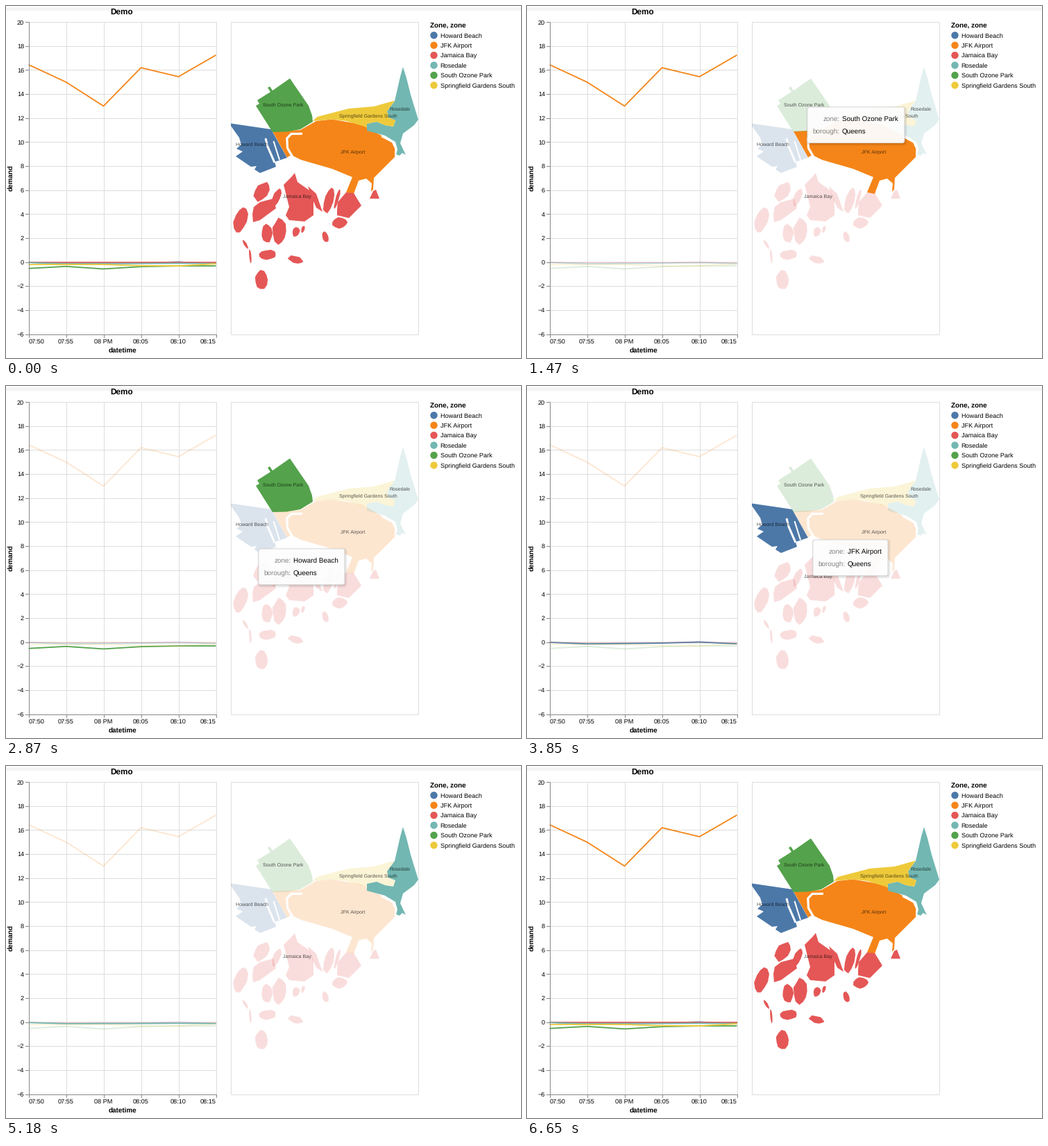
These frames come from a looping animation (742 px wide and 508 px high, 6720 ms). A matplotlib script:

```python
import matplotlib.pyplot as plt
import numpy as np
from matplotlib.animation import FuncAnimation
from matplotlib.patches import Circle, FancyBboxPatch, Polygon, Rectangle
from matplotlib.transforms import Affine2D

W, H, DPI = 742, 508, 100
PX = 72 / DPI
FRAMES, INTERVAL = 96, 70
DIM = 0.2

plt.rcParams["font.family"] = "Liberation Sans"
plt.rcParams["text.hinting"] = "no_hinting"
plt.rcParams["toolbar"] = "None"

HOWARD, JFK, BAY = "Howard Beach", "JFK Airport", "Jamaica Bay"
ROSEDALE, OZONE = "Rosedale", "South Ozone Park"
SPRINGFIELD = "Springfield Gardens South"

# Selected zone from each start frame on
SELECTED = [(0, None), (7, JFK), (31, OZONE), (49, HOWARD),
            (67, ROSEDALE), (94, None)]

# Tooltip: start, end of move, last frame shown, zone, from, to
HOVERS = [
    (15, 15, 15, OZONE, (425, 153), (425, 153)),
    (16, 16, 18, OZONE, (442, 163), (442, 163)),
    (19, 21, 36, OZONE, (429, 157), (404, 146)),
    (37, 38, 38, OZONE, (400, 143), (391, 160)),
    (39, 41, 43, HOWARD, (379, 186), (364, 235)),
    (44, 46, 54, HOWARD, (365, 234), (367, 232)),
    (55, 55, 55, JFK, (412, 222), (412, 222)),
    (62, 63, 64, ROSEDALE, (580, 149), (574, 147)),
    (71, 73, 73, ROSEDALE, (541, 186), (574, 84)),
]

fig = plt.figure(figsize=(W / DPI, H / DPI), dpi=DPI, facecolor="white")
ax = fig.add_axes([0, 0, 1, 1])
ax.set_xlim(0, W)
ax.set_ylim(H, 0)
ax.axis("off")


def text(x, y, s, size, ha="left", **kw):
    """Text whose capitals are centred on y; size in pixels."""
    return ax.text(x, y + 0.36 * size, s, fontsize=size * PX, ha=ha,
                   va="baseline", **kw)


def line(xs, ys, color, width=1.0, **kw):
    return ax.plot(xs, ys, color=color, lw=width * PX, **kw)[0]


def frame_box(x0, y0, x1, y1):
    ax.add_patch(Rectangle((x0, y0), x1 - x0, y1 - y0, fill=False,
                           ec="#dddddd", lw=PX, zorder=1))


# Line chart
LEFT, RIGHT, TOP, BOTTOM = 32.5, 302.5, 23.2, 473.5


def chart_y(v):
    return TOP + (20 - np.asarray(v)) * (BOTTOM - TOP) / 26


ax.add_patch(Rectangle((0, 1.5), W, 5, fc="#f4f4f4", ec="none", zorder=0))
times = np.linspace(LEFT, RIGHT, 6)
frame_box(LEFT, TOP, RIGHT, BOTTOM)
for v in range(-6, 21, 2):
    y = float(chart_y(v))
    line([LEFT, RIGHT], [y, y], "#dddddd", zorder=1)
    line([LEFT - 4.5, LEFT], [y, y], "#888888", zorder=4)
    text(26, y, str(v).replace("-", "\u2212"), 9.1, "right")
names = ["07:50", "07:55", "08 PM", "08:05", "08:10", "08:15"]
for x, name, ha in zip(times, names, ["left"] + ["center"] * 4 + ["right"]):
    line([x, x], [TOP, BOTTOM], "#dddddd", zorder=1)
    line([x, x], [BOTTOM, BOTTOM + 4.5], "#888888", zorder=4)
    text(x, 484, name, 9.1, ha)
line([LEFT, LEFT], [TOP, BOTTOM], "#888888", zorder=4)
line([LEFT, RIGHT], [BOTTOM, BOTTOM], "#888888", zorder=4)
text(167, 8, "Demo", 11.7, "center", weight="bold")
text(167.5, 496.5, "datetime", 9.9, "center", weight="bold")
ax.text(7, 248, "demand", fontsize=9.9 * PX, weight="bold", rotation=90,
        ha="center", va="center")

# Zones: one series, one map label and one legend row each
frame_box(324, TOP, 594, BOTTOM)
text(611, 28, "Zone, zone", 9.9, weight="bold")
parts, colors = {}, {}


def add_zone(zone, color, label_at, demand):
    y = 42.3 + 14.42 * len(parts)
    colors[zone] = color
    parts[zone] = [line(times, chart_y(demand), color, 1.8, zorder=3,
                        solid_capstyle="butt")]
    text(*label_at, zone, 7.2, "center", color="black", alpha=0.65, zorder=5)
    ax.add_patch(Circle((616.5, y), 5.2, fc=color, ec="none"))
    text(625.5, y, zone, 9.1)


def area(zone, *xy):
    """Land outline from x, y pairs."""
    shape = Polygon(np.reshape(xy, (-1, 2)), fc=colors[zone], ec="none", zorder=2)
    parts[zone].append(ax.add_patch(shape))


def islet(zone, x, y, rx, ry, tilt):
    """Rough-edged ellipse; a positive tilt leans its top to the right."""
    a = np.linspace(0, 2 * np.pi, 11, endpoint=False)
    r = rng.uniform(0.88, 1.12, a.size)
    u, v, t = rx * r * np.cos(a), ry * r * np.sin(a), np.radians(tilt)
    area(zone, *np.column_stack([x + u * np.cos(t) - v * np.sin(t),
                                 y + u * np.sin(t) + v * np.cos(t)]).ravel())


def channel(width, *xy):
    line(xy[::2], xy[1::2], "white", width, zorder=2.5, solid_capstyle="butt")


rng = np.random.default_rng(4)

add_zone(HOWARD, "#4c78a8", (354, 199), [-0.02, -0.15, -0.12, -0.08, 0.01, -0.15])
area(HOWARD, 324, 169.5, 382, 178, 405, 219, 387, 225, 389, 232, 366, 241,
     358, 236, 361, 231, 353, 232, 331, 217, 341, 210, 332, 206, 339, 200,
     336, 190, 324, 173)

add_zone(JFK, "#f58518", (499.5, 210), [16.45, 15, 13, 16.2, 15.45, 17.25])
area(JFK, 384, 181, 424, 179, 447, 166, 470, 163.5, 512, 171, 557, 196,
     561, 207, 560, 218, 530, 248, 529, 265, 526, 268, 527, 256, 519, 249,
     508, 252, 501, 271, 490, 269, 499, 247, 470, 235, 425, 222, 411, 215,
     405, 218.5)

add_zone(BAY, "#e45756", (419, 273.5), [0] * 6)
area(BAY, 416, 241, 420, 254, 437, 266, 443, 280, 443, 302, 430, 311,
     408, 309, 403, 302, 408, 290, 400, 258, 411, 247)
area(BAY, 355, 300, 357, 290, 366, 283, 385, 278, 389, 292, 366, 309, 356, 312)
area(BAY, 477, 294, 478, 283, 490, 269, 501, 270, 512, 288, 494, 306, 477, 302)
area(BAY, 435, 260, 447, 271, 456, 297, 447, 291, 439, 273)
area(BAY, 524, 278, 529, 267, 533, 265, 538, 278)
for spot in [(368, 268, 9, 15, 35), (390, 276, 5, 13, 20), (338, 309, 9, 19, 15),
             (376, 328, 8, 13, 0), (394, 325, 10, 18, 0), (418, 326, 5, 7, 20),
             (428, 322, 2.5, 5, 20), (465, 281, 6.5, 19, 15),
             (477, 279, 2.5, 15, 15), (481, 313, 11, 8, -5),
             (460, 333, 4.5, 7.5, -20), (376.5, 359, 12, 7, -3),
             (417, 366, 11, 5, 15), (368, 395, 9, 13, 0),
             (345, 344, 2, 7, -30), (352, 361, 1.5, 10, -5)]:
    islet(BAY, *spot)

add_zone(ROSEDALE, "#72b7b2", (567.5, 148.5),
         [-0.04, -0.13, -0.12, -0.12, -0.1, -0.12])
area(ROSEDALE, 572, 88, 577, 104, 583, 128, 594, 164, 588, 172, 572, 184,
     568, 198, 576, 215, 571, 212, 567, 216, 562, 214, 564, 207, 561, 196,
     546, 187, 520, 180, 520, 170, 534, 167, 546, 172, 558, 174, 561, 165,
     551, 161, 549, 152, 560, 137, 568, 102)

add_zone(OZONE, "#54a24b", (399, 142), [-0.53, -0.36, -0.57, -0.38, -0.32, -0.32])
area(OZONE, 384, 182, 360, 144, 365, 141, 362, 136, 381, 124, 377, 118,
     380, 116, 384, 122, 409, 104.5, 436, 144, 441, 158, 442, 167, 424, 178,
     404, 181.5)

add_zone(SPRINGFIELD, "#eeca3b", (521.5, 157.5),
         [-0.2, -0.2, -0.2, -0.3, -0.32, -0.14])
area(SPRINGFIELD, 442, 166, 448, 160, 494, 148, 530, 145, 560, 136.5, 549, 152,
     551, 161, 561, 165, 558, 174, 546, 172, 534, 167, 520, 170, 520, 175,
     490, 166, 470, 163.5)

channel(3, 374, 191, 377, 203, 387, 226)
channel(2, 385.5, 195, 394, 222)
channel(3.2, 427, 184.3, 411, 184.5, 404.8, 191, 405.5, 205, 413, 218)
channel(2.2, 541, 188, 557, 196.5, 561.5, 206, 561, 215)

# Tooltip, built at the origin and shifted into place
shift = Affine2D()
place = shift + ax.transData


def tip_box(grow, dx, dy, **kw):
    box = FancyBboxPatch((dx - grow, dy - grow), 100, 51.5 + 2 * grow,
                         boxstyle=f"round,pad=0,rounding_size={3 + grow}",
                         transform=place, **kw)
    box.grow = grow
    return ax.add_patch(box)


boxes = [tip_box(g, 1, 1.5, fc="black", ec="none", alpha=0.035, zorder=8)
         for g in range(4)]
boxes.append(tip_box(0, 0, 0, fc=(1, 1, 1, 0.95), ec="#dcdcdc", lw=PX, zorder=9))
tip_style = dict(transform=place, zorder=10)
zone_text = text(50, 16.5, "", 9.9, **tip_style)
tip = boxes + [
    zone_text,
    text(50, 34.2, "Queens", 9.9, **tip_style),
    text(46.8, 16.5, "zone:", 9.9, "right", color="#828282", **tip_style),
    text(46.8, 34.2, "borough:", 9.9, "right", color="#828282", **tip_style),
]


def show_tip(zone, x, y):
    shift.clear().translate(x, y)
    zone_text.set_text(zone)
    width = 59 + zone_text.get_window_extent().width * W / fig.bbox.width
    for box in boxes:
        box.set_width(width + 2 * box.grow)


def update(i):
    chosen = [zone for start, zone in SELECTED if start <= i][-1]
    for zone, artists in parts.items():
        for artist in artists:
            artist.set_alpha(1 if chosen in (None, zone) else DIM)

    hover = next((h for h in HOVERS if h[0] <= i <= h[2]), None)
    for artist in tip:
        artist.set_visible(hover is not None)
    if hover:
        start, end, _, zone, a, b = hover
        t = min((i - start) / max(end - start, 1), 1)
        show_tip(zone, *(np.array(a) + t * np.subtract(b, a)))
    return []


anim = FuncAnimation(fig, update, frames=FRAMES, interval=INTERVAL,
                     init_func=lambda: update(0), repeat=True,
                     repeat_delay=0, blit=False)
plt.show()
```
